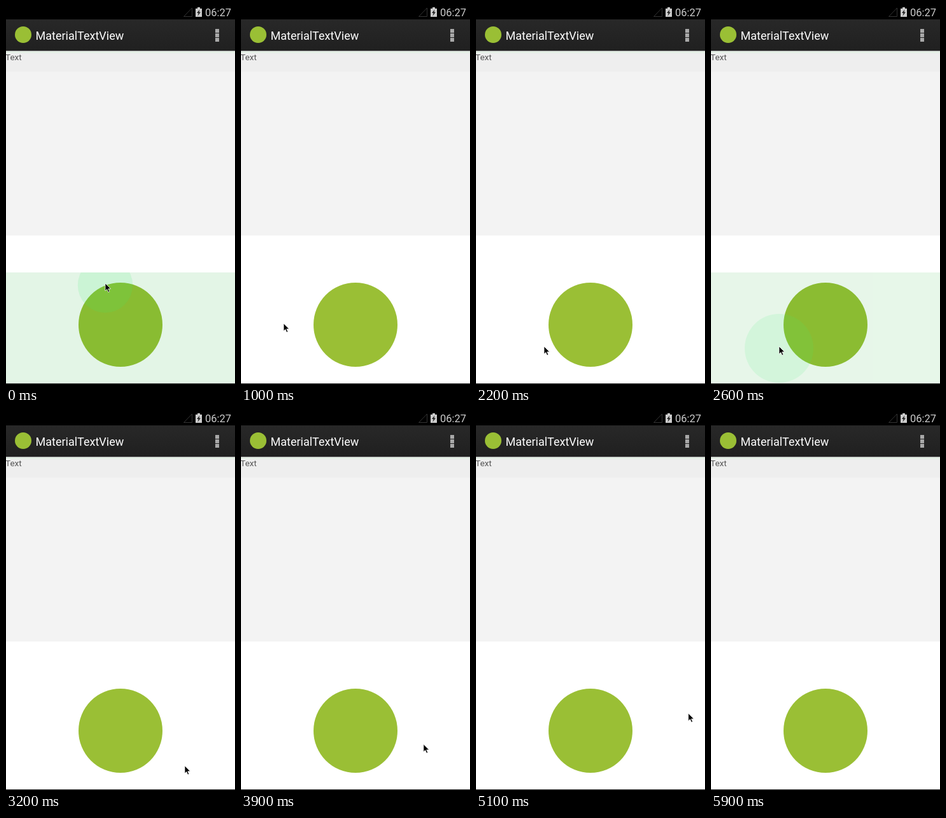
These frames come from a looping animation (360x593 px, 6 s). An HTML page:

```html
<!DOCTYPE html>
<html lang="en">
<head>
<meta charset="utf-8">
<title>MaterialTextView</title>
<style>
  html, body { margin: 0; width: 100%; height: 100%; overflow: hidden; background: #fff; }
  svg { display: block; font-family: Roboto, sans-serif; }
</style>
</head>
<body>
<svg width="360" height="593" viewBox="0 0 360 593">
  <defs>
    <linearGradient id="bar" x2="0" y2="1">
      <stop stop-color="#282828"/>
      <stop offset="1" stop-color="#202020"/>
    </linearGradient>
    <clipPath id="panel"><rect y="418" width="360" height="174"/></clipPath>
  </defs>

  <rect width="360" height="593" fill="#fff"/>
  <rect y="70" width="360" height="290" fill="#f3f3f3"/>
  <rect y="70" width="360" height="33" fill="#eee"/>
  <rect y="71" width="360" height="3" fill="#e5f0e6"/>
  <text x="-1" y="85" font-size="13.5" fill="#555">Text</text>

  <rect width="360" height="21" fill="#000"/>
  <path d="M279.500 16.500 292.500 3v13.500z" fill="none" stroke="#333"/>
  <path d="M301 2h4v2h3v13h-10V4h3z" fill="#ccc"/>
  <path d="M304.500 5.500 300 11h2.500l-1 4.500 4.500-6h-2.500z" fill="#222"/>
  <text x="313" y="16" font-size="16.500" fill="#ccc">06:27</text>

  <rect y="21" width="360" height="49" fill="url(#bar)"/>
  <rect y="70" width="360" height="1" fill="#999"/>
  <circle cx="27" cy="45" r="13" fill="#9abf35"/>
  <text x="46.500" y="53" font-size="18" fill="#fff">MaterialTextView</text>
  <g fill="#a8a8a8">
    <rect x="329" y="36" width="6" height="6"/>
    <rect x="329" y="43" width="6" height="6"/>
    <rect x="329" y="50" width="6" height="6"/>
  </g>

  <circle cx="180" cy="500" r="66" fill="#9abf35"/>

  <g id="ripple" clip-path="url(#panel)">
    <rect y="418" width="360" height="174" fill="#00a41e" fill-opacity=".11"/>
    <circle id="wave" fill="#3ce66e" fill-opacity=".14"/>
  </g>
  <rect y="592" width="360" height="1" fill="#222"/>

  <path id="cursor" d="M0 0v13l3-2.800 2.200 5 2.200-1-2.200-4.700h4.300z"
        fill="#000" stroke="#fff" stroke-width=".8"/>
</svg>
<script>
  const LOOP = 6000, STEP = 100;
  const LIFE = 600, FADE = 350, SPEED = 0.18;  // ripple: ms, ms, px per ms
  const REST = 400, AIM = 200;                 // pointer stays after and before a tap

  const $ = id => document.getElementById(id);
  const ripple = $('ripple'), wave = $('wave'), cursor = $('cursor');

  // The pointer glides from tap to tap, then leaves the stage.
  const taps = [
    { at: -240, x: 156, y: 435 },
    { at: 1150, x: 67, y: 498 },
    { at: 2300, x: 107, y: 534 },
    { at: 3230, x: 281, y: 555 },
    { at: 4433, x: 295, y: 475 }
  ];
  const exit = { at: 5600, x: 380, y: 470 };

  const mix = (a, b, k) => a + (b - a) * k;
  const clamp = v => Math.min(1, Math.max(0, v));
  const smooth = u => u * u * (3 - 2 * u);

  function draw(t) {
    const i = taps.findLastIndex(tap => tap.at <= t);
    const tap = taps[i], next = taps[i + 1] || exit;
    const age = t - tap.at;

    wave.setAttribute('cx', tap.x);
    wave.setAttribute('cy', tap.y + 3);
    wave.setAttribute('r', age * SPEED);
    ripple.setAttribute('opacity', clamp((LIFE - age) / FADE));

    const travel = next.at - tap.at - REST - AIM;
    const k = smooth(clamp((age - REST) / travel));
    const x = mix(tap.x, next.x, k), y = mix(tap.y, next.y, k);
    cursor.setAttribute('transform', `translate(${x} ${y}) scale(.92)`);
  }

  const begin = performance.now();
  function tick() {
    const t = (performance.now() - begin) % LOOP;
    draw(Math.floor(t / STEP) * STEP);
    requestAnimationFrame(tick);
  }
  tick();
</script>
</body>
</html>
```
